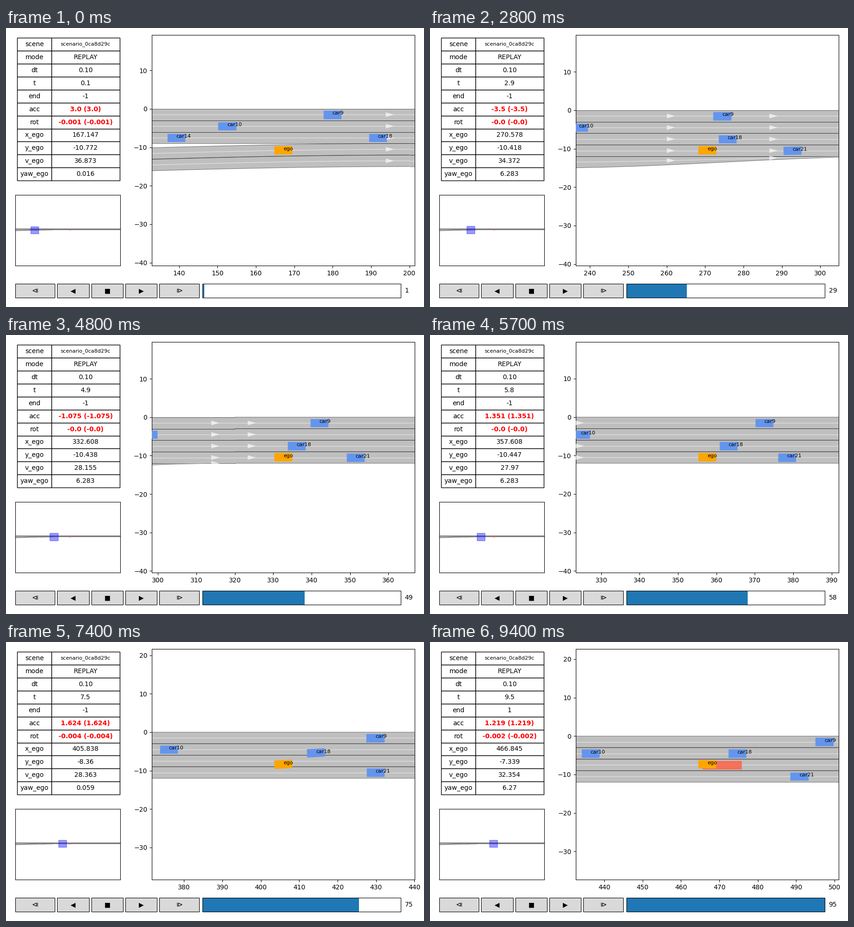
Write a matplotlib script that moves like this. It is 900 px wide and 600 px high and loops after 9.5 s.

```python
import numpy as np
import matplotlib.pyplot as plt
from matplotlib.animation import FuncAnimation
from matplotlib.patches import Polygon, Rectangle
from matplotlib.ticker import MultipleLocator

W, H, FRAMES = 900, 600, 95
STEPS = np.arange(FRAMES)
plt.rcParams["font.family"] = "DejaVu Sans"
fig = plt.figure(figsize=(W / 100, H / 100), dpi=100, facecolor="white")


def pixel_axes(left, top, right, bottom):
    return fig.add_axes([left / W, 1 - bottom / H,
                         (right - left) / W, (bottom - top) / H])


# ---------- motion ----------
def smooth(s):
    s = np.clip(s, 0, 1)
    return s * s * (3 - 2 * s)


def hermite(keys, values, slopes):
    """Cubic through the values with the given per-step slopes."""
    i = np.clip(np.searchsorted(keys, STEPS, "right") - 1, 0, len(keys) - 2)
    h = keys[i + 1] - keys[i]
    s = (STEPS - keys[i]) / h
    ease = smooth(s)
    return (values[i] * (1 - ease) + values[i + 1] * ease
            + h * s * (1 - s) * (slopes[i] * (1 - s) - slopes[i + 1] * s))


# Ego waypoints: step, x, speed, acceleration, y, yaw, rotation
keys, x, v, a, y, yaw, rot = np.array([
    (0, 167.147, 36.873, 3, -10.772, .016, -.001),
    (13, 215.589, 37.426, .178, -10.404, 0, -.0001),
    (28, 270.578, 34.372, -3.5, -10.418, -.0003, -.0001),
    (39, 306.46, 30.522, -3.5, -10.429, -.0003, -.0001),
    (57, 357.608, 27.97, 1.351, -10.447, -.0003, -.0001),
    (74, 405.838, 28.363, 1.624, -8.36, .059, -.004),
    (94, 466.845, 32.354, 1.219, -7.339, -.013, -.002),
]).T
keys = keys.astype(int)
ego_x = hermite(keys, x, v / 10)
ego_y = hermite(keys, y, v * np.tan(yaw) / 10)
ego_v = hermite(keys, v, a / 10)
ego_a = np.interp(STEPS, keys, a)
ego_rot = np.interp(STEPS, keys, rot)
ego_yaw = np.interp(STEPS, keys, yaw)


def car_path(x, y):
    y = y + 0 * x
    return x, y, np.arctan2(np.gradient(y), np.gradient(x))


def lane_change(y, start, end):
    return y + 3 * smooth((STEPS - start) / (end - start))


k = STEPS
paths = {
    "car9": car_path(179.9 + 3.377 * k, -1.5),
    "car10": car_path(152.5 + 3.02 * k, -4.5),
    "car14": car_path(139.3 + 3.12 * k - .0006 * k**2, -7.5),
    "car18": car_path(191.8 + 3 * k + .0001 * k**2, lane_change(-7.5, 60, 82)),
    "car21": car_path(203 + 3.06 * k + 16.6 * np.exp(-k / 20),
                      lane_change(-13.5, 12, 29)),
    "ego": (ego_x, ego_y, ego_yaw),
}


# ---------- road ----------
def ramp(y):
    return lambda x: y - 4.2 * smooth((200 - x) / 200)


def flat(y):
    return lambda x: y + 0 * x


def taper(x):
    return -15 + 3 * smooth((x - 230) / 90)


MAIN = [(flat(y), flat(y - 3)) for y in (0, -3, -6)]
LANE4, LANE5 = (flat(-9), flat(-12)), (flat(-12), flat(-15))
SEGMENTS = [
    (-50, 200, MAIN + [(ramp(-9), ramp(-12)), (ramp(-12), ramp(-15))], [196]),
    (200, 230, MAIN + [LANE4, LANE5], []),
    (230, 320, MAIN + [LANE4, (flat(-12), taper)],
     [235.6, 262.2, 288.9, 316]),
    (320, 1000, MAIN + [LANE4], [325.5]),
]


def draw_road(ax, width, detail):
    for x0, x1, lanes, tips in SEGMENTS:
        for top, bottom in lanes:
            x = np.linspace(x0, x1, 60)
            a, b = top(x), bottom(x)
            ax.fill(np.r_[x, x[::-1]], np.r_[a, b[::-1]], color="gray",
                    alpha=.5, lw=0, zorder=1, snap=False)
            for edge in (a, b):
                ax.plot(x, edge, color="black", alpha=.5, lw=width, zorder=2,
                        snap=False if x0 == 320 else None,
                        solid_capstyle="butt")
            if not detail:
                continue
            ax.plot(x, (a + b) / 2, color="white", alpha=.5, lw=1, zorder=2,
                    solid_capstyle="butt")
            for tip in tips:
                y = (top(tip) + bottom(tip)) / 2
                ax.fill([tip - 2.15, tip, tip - 2.15], [y + .6, y, y - .6],
                        color="white", alpha=.65, lw=0, zorder=3)


def draw_goal(ax):
    ax.add_patch(Rectangle((465.65, -8.5), 10, 2, color="tomato", alpha=.85,
                           lw=1, zorder=4))


# ---------- panels ----------
panel = pixel_axes(0, 0, W, H)
panel.set(xlim=(0, W), ylim=(H, 0))
panel.axis("off")

view = pixel_axes(314, 15, 880, 511)
view.xaxis.set_major_locator(MultipleLocator(10))
view.yaxis.set_major_locator(MultipleLocator(10))
draw_road(view, .7, True)
draw_goal(view)

overview = pixel_axes(20, 359, 246, 511)
overview.set(xticks=[], yticks=[])
draw_road(overview, .25, False)
draw_goal(overview)
overview.set(xlim=(3.4, 900.6), ylim=(-316, 287.4))

HALF_H = 30
HALF_W = HALF_H * 566 / 496
window = overview.add_patch(Rectangle((0, 0), 2 * HALF_W, 2 * HALF_H,
                                      color="blue", alpha=.4, lw=1, zorder=5))


def box(left, top, right, bottom, face, line=.8):
    return panel.add_patch(Rectangle((left, top), right - left, bottom - top,
                                     fc=face, ec="black", lw=line))


def label(x, y, text, **style):
    style = {"ha": "center", "va": "center", "fontsize": 10, **style}
    return panel.text(x, y, text, **style)


cells = {}
ROWS = ["scene", "mode", "dt", "t", "end", "acc", "rot", "x_ego", "y_ego",
        "v_ego", "yaw_ego"]
ROW_H = 27.92
for r, name in enumerate(ROWS):
    mid = 35.03 + ROW_H * r
    for left, right in ((24, 98), (98, 245)):
        box(left, mid - ROW_H / 2, right, mid + ROW_H / 2, "white", 1)
    label(61.3, mid, name)
    style = {"color": "red", "weight": "bold"} if name in ("acc", "rot") else {}
    cells[name] = label(171.3, mid, "", **style)
cells["scene"].set(text="scenario_0ca8d29c", fontsize=8)
cells["mode"].set_text("REPLAY")
cells["dt"].set_text("0.10")

BUTTONS = [(20, 105, "\u29cf"), (110, 179, "\u25c0"), (184, 252, "\u25a0"),
           (257, 325, "\u25b6"), (330, 416, "\u29d0")]
for left, right, mark in BUTTONS:
    box(left, 550, right, 580, "0.85")
    label((left + right) / 2, 565, mark)

SLIDER, SLIDER_W = 423, 427
bar = panel.add_patch(Rectangle((SLIDER, 550), 0, 30, color="#1f77b4", lw=0))
box(SLIDER, 550, SLIDER + SLIDER_W, 580, "none")
count = label(SLIDER + 1.02 * SLIDER_W, 565, "", ha="left")

# ---------- vehicles ----------
CORNERS = np.array([[-2.25, -1], [2.25, -1], [2.25, 1], [-2.25, 1]])
cars = {}
for name in paths:
    color = "orange" if name == "ego" else "cornflowerblue"
    body = view.add_patch(Polygon(CORNERS, color=color, lw=1,
                                  zorder=6 if name == "ego" else 5))
    cars[name] = body, view.text(0, 0, name, fontsize=8, zorder=7)


def rounded(value):
    return str(round(float(value), 3))


def update(k):
    cx, cy = ego_x[k], ego_y[k]
    view.set_xlim(cx - HALF_W, cx + HALF_W)
    view.set_ylim(cy - HALF_H, cy + HALF_H)
    window.set_xy((cx - HALF_W, cy - HALF_H))

    for name, (body, tag) in cars.items():
        x, y, yaw = (p[k] for p in paths[name])
        c, s = np.cos(yaw), np.sin(yaw)
        body.set_xy(CORNERS @ np.array([[c, s], [-s, c]]) + (x, y))
        tag.set_position((x, y))
        tag.set_visible(bool(abs(x - cx) <= HALF_W))

    acc, rot = rounded(ego_a[k]), rounded(ego_rot[k])
    values = {
        "t": str((k + 1) / 10),
        "end": "1" if k == FRAMES - 1 else "-1",
        "acc": f"{acc} ({acc})",
        "rot": f"{rot} ({rot})",
        "x_ego": rounded(cx),
        "y_ego": rounded(cy),
        "v_ego": rounded(ego_v[k]),
        "yaw_ego": rounded(ego_yaw[k] % (2 * np.pi)),
    }
    for name, text in values.items():
        cells[name].set_text(text)

    bar.set_width(SLIDER_W * (k + 1) / FRAMES)
    count.set_text(str(k + 1))
    return []


anim = FuncAnimation(fig, update, frames=FRAMES, interval=100, repeat=True,
                     init_func=lambda: update(0), blit=False)
plt.show()
```
